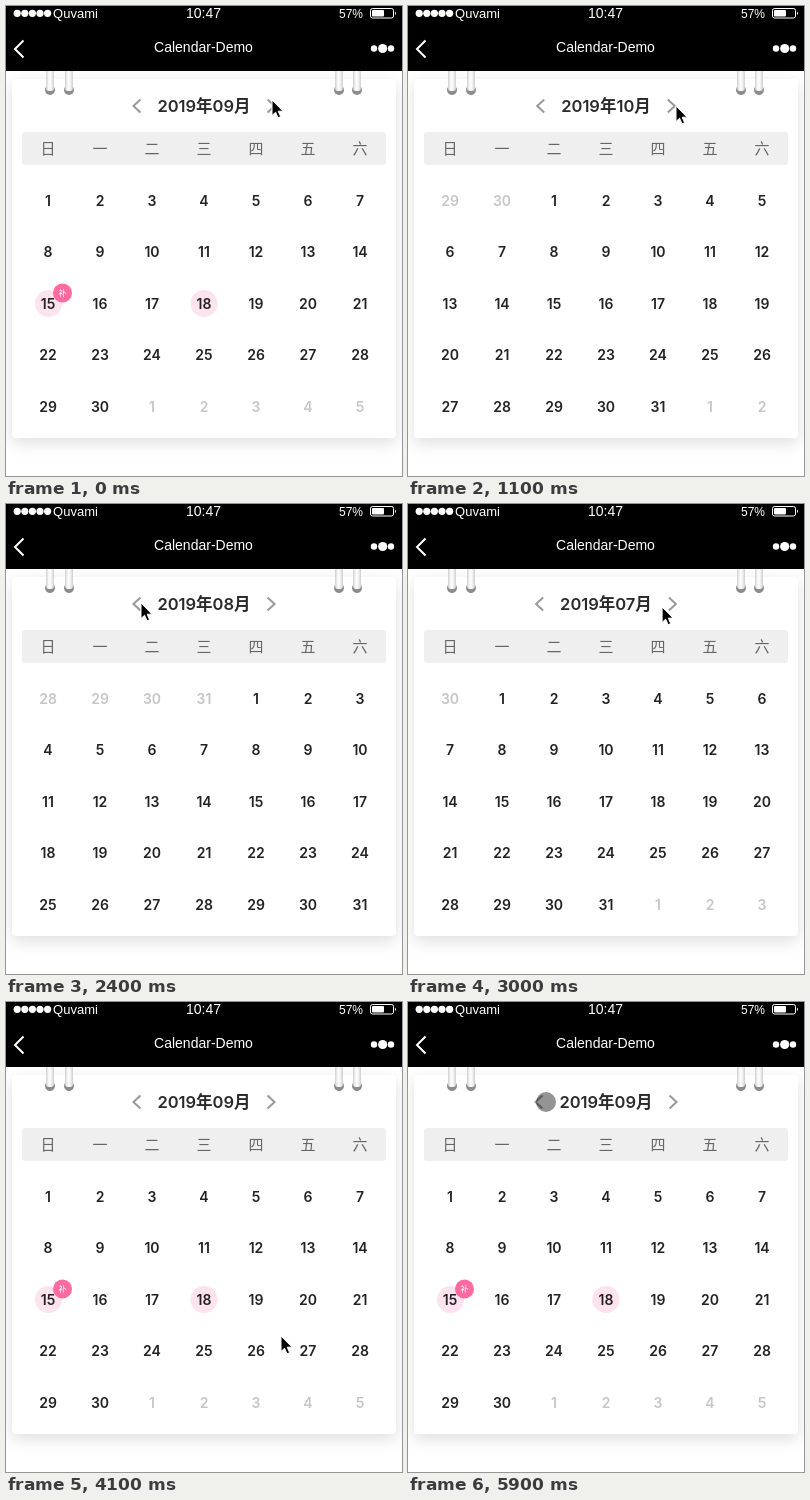
These frames come from a looping animation (396 px wide and 470 px high, 6000 ms). An HTML page:

```html
<!DOCTYPE html>
<html lang="zh-CN">
<head>
<meta charset="utf-8">
<title>Calendar-Demo</title>
<style>
  html, body { margin: 0; width: 100%; height: 100%; overflow: hidden; background: #fff; }
  svg { display: block; }
  text { font-family: Inter, "Noto Sans CJK SC", "Noto Sans CJK", sans-serif; text-anchor: middle; }
  .bar text { font-family: "Liberation Sans", Arial, sans-serif; fill: #fff; }
  .card { fill: #fff; filter: drop-shadow(0 5px 8px rgba(0, 0, 0, .13)); }
  .week text { font-size: 15px; fill: #666; }
  .days text { font-size: 14px; font-weight: 600; fill: #222; }
  .days .out { fill: #c6c6c6; }
  .arrow { fill: none; stroke: #999; stroke-width: 2; }
  #title { font-size: 16.5px; font-weight: 600; fill: #2a2a2a; }
</style>
</head>
<body>
<svg width="396" height="470" viewBox="0 0 396 470">
  <defs>
    <linearGradient id="metal">
      <stop offset="0" stop-color="#cfcfcf"/>
      <stop offset=".4" stop-color="#fff"/>
      <stop offset=".65" stop-color="#f4f4f4"/>
      <stop offset="1" stop-color="#cfcfcf"/>
    </linearGradient>
    <g id="ring">
      <circle cy="84" r="5" fill="#8c8c8c"/>
      <rect x="-4" y="60" width="8" height="25" rx="3" fill="url(#metal)"/>
    </g>
  </defs>

  <rect class="card" x="6" y="73" width="384" height="359" rx="4"/>
  <use href="#ring" x="44"/><use href="#ring" x="63"/>
  <use href="#ring" x="333"/><use href="#ring" x="351"/>

  <g class="bar">
    <rect width="396" height="65"/>
    <g id="signal" fill="#fff"></g>
    <text x="69.5" y="12" font-size="13">Quvami</text>
    <text x="197.5" y="12" font-size="14">10:47</text>
    <text x="345" y="12" font-size="12">57%</text>
    <rect x="364.5" y="2.5" width="23" height="9.5" rx="2" fill="none" stroke="#fff"/>
    <rect x="366" y="4" width="12" height="6.5" rx="1" fill="#fff"/>
    <path d="M389 5.5q2 1.8 0 3.6z" fill="#fff"/>
    <path d="M17.5 34.5L9 43l8.5 8.5" fill="none" stroke="#fff" stroke-width="2"/>
    <text x="197.5" y="46" font-size="14">Calendar-Demo</text>
    <g fill="#fff">
      <circle cx="368" cy="42.5" r="3.2"/>
      <circle cx="376.7" cy="42.5" r="4.6"/>
      <circle cx="385" cy="42.5" r="3.2"/>
    </g>
  </g>

  <text id="title" x="198" y="106"></text>
  <path id="prev" class="arrow" d="M8.5 -6.5L1.5 0l7 6.5"/>
  <path id="next" class="arrow" d="M1.5 -6.5L8.5 0l-7 6.5"/>

  <rect x="16" y="126" width="364" height="33" rx="3" fill="#efefef"/>
  <g id="week" class="week"></g>
  <g id="marks">
    <circle cx="42.5" cy="297.5" r="13.5" fill="#fde3ed"/>
    <circle cx="198" cy="297.5" r="13.5" fill="#fde3ed"/>
  </g>
  <g id="days" class="days"></g>
  <g id="badge">
    <circle cx="56.5" cy="287" r="9.5" fill="#ff6a9f"/>
    <text x="56.5" y="290" font-size="8" fill="#fff">补</text>
  </g>

  <path id="cursor" d="M0 0V15.5L3.6 12.2L6 17.8L8.6 16.7L6.2 11.2H11Z" stroke="#fff" stroke-width="1"/>
  <circle id="touch" r="10" fill="#000" fill-opacity=".42"/>
</svg>
<script>
const LOOP = 6000, STEP = 100, YEAR = 2019;
const $ = id => document.getElementById(id);

// [time, month]
const months = [
  [0, 9], [800, 10], [1600, 9], [2200, 8], [2600, 7],
  [3200, 8], [3700, 9], [5200, 10], [5800, 9]
];
// [time, x, y]
const cursorPath = [
  [0, 266, 94], [1000, 268, 100], [1200, 268, 100], [1500, 135, 99],
  [2600, 135, 99], [2900, 254, 103], [3700, 256, 101],
  [4100, 275, 334], [4200, 276, 340], [4600, 300, 480]
];
const touchPath = [
  [4600, 296, -14], [4900, 288, 70], [5000, 281, 115],
  [5200, 268, 102], [5400, 268, 102], [5700, 138, 100]
];

function add(parent, tag, attrs, label = '') {
  const node = document.createElementNS('http://www.w3.org/2000/svg', tag);
  for (const key in attrs) node.setAttribute(key, attrs[key]);
  node.textContent = label;
  return parent.appendChild(node);
}

function along(path, t) {
  const i = path.findIndex(p => p[0] > t);
  if (i === 0) return path[0].slice(1);
  if (i < 0) return path[path.length - 1].slice(1);
  const [t0, x0, y0] = path[i - 1], [t1, x1, y1] = path[i];
  const k = (t - t0) / (t1 - t0), e = k * k * (3 - 2 * k);
  return [x0 + (x1 - x0) * e, y0 + (y1 - y0) * e];
}

const moveTo = (node, [x, y]) => node.setAttribute('transform', `translate(${x} ${y})`);
const show = (node, on) => node.setAttribute('visibility', on ? 'visible' : 'hidden');

for (let i = 0; i < 5; i++) add($('signal'), 'circle', { cx: 11.2 + i * 7.6, cy: 7.3, r: 3.6 });
[...'日一二三四五六'].forEach((d, i) => add($('week'), 'text', { x: 42 + i * 52, y: 148 }, d));
const cells = Array.from({ length: 35 }, (_, i) =>
  add($('days'), 'text', { x: 42 + i % 7 * 52, y: 199.5 + Math.floor(i / 7) * 51.5 }));

let shown = 0;
function setMonth(m) {
  if (m === shown) return;
  shown = m;
  const lead = new Date(YEAR, m - 1, 1).getDay();
  cells.forEach((cell, i) => {
    const date = new Date(YEAR, m - 1, i - lead + 1);
    cell.textContent = date.getDate();
    cell.setAttribute('class', date.getMonth() === m - 1 ? '' : 'out');
  });
  const title = $('title');
  title.textContent = `${YEAR}年${String(m).padStart(2, '0')}月`;
  const half = title.getComputedTextLength() / 2;
  moveTo($('prev'), [198 - half - 25.5, 100]);
  moveTo($('next'), [198 + half + 15.5, 100]);
  show($('marks'), m === 9);
  show($('badge'), m === 9);
}

function draw(now) {
  const t = Math.floor(now % LOOP / STEP) * STEP;
  setMonth(months.filter(([at]) => at <= t).pop()[1]);
  show($('cursor'), t < 4600);
  show($('touch'), t >= 4600);
  moveTo($('cursor'), along(cursorPath, t));
  moveTo($('touch'), along(touchPath, t));
}

const start = performance.now();
function tick() {
  draw(performance.now() - start);
  requestAnimationFrame(tick);
}
tick();
</script>
</body>
</html>
```
